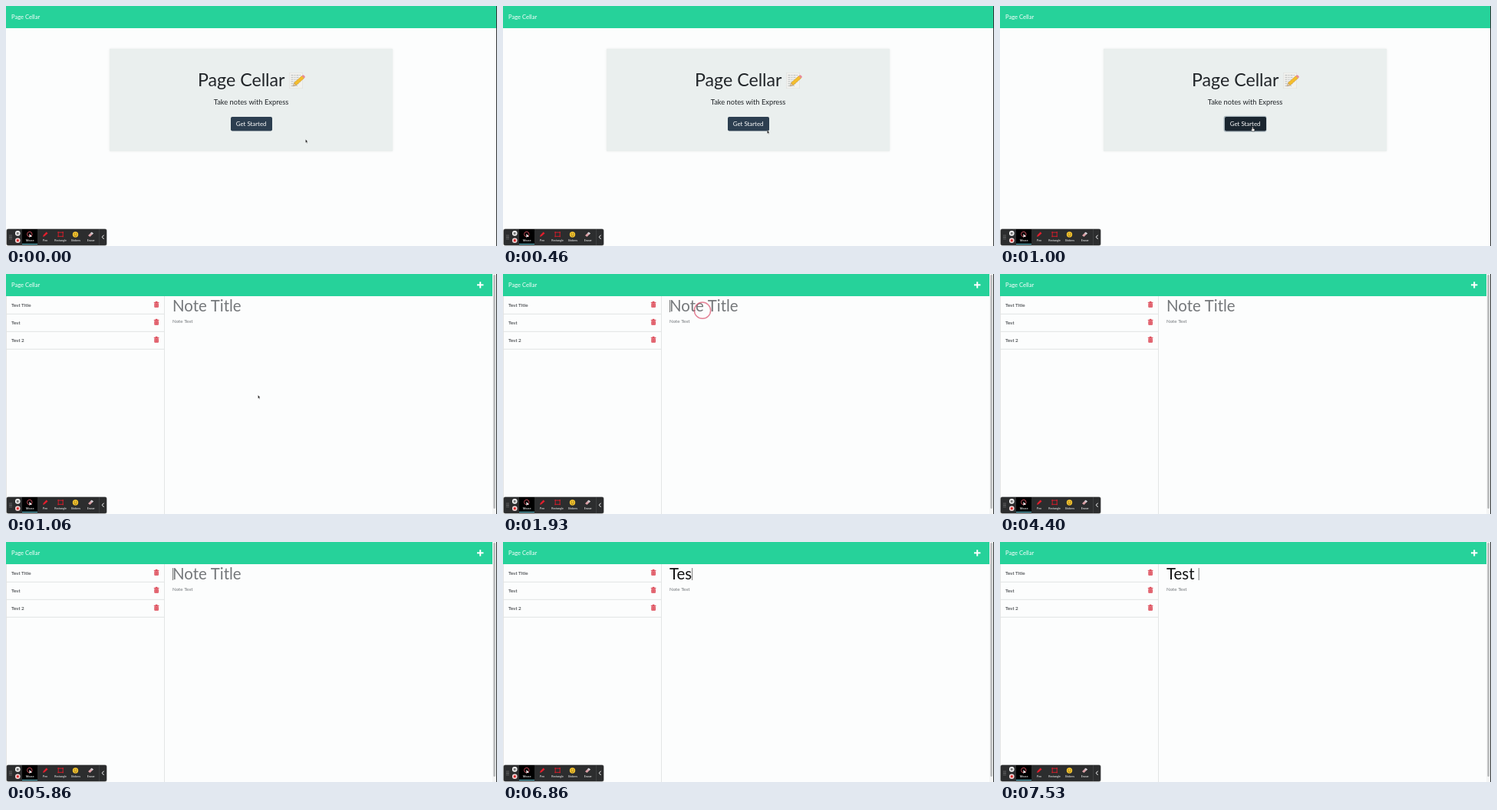
An HTML page with a canvas that plays this animation: 640x314 px, repeating every 8 s.

```html
<!DOCTYPE html>
<html lang="en">
<head>
<meta charset="utf-8">
<title>Notes app demo</title>
<style>
  html, body { margin: 0; width: 100%; height: 100%; overflow: hidden; background: #fcfdfd; }
  canvas { display: block; width: 640px; height: 314px; }
</style>
</head>
<body>
<canvas id="stage" width="640" height="314"></canvas>
<script>
const ctx = document.getElementById('stage').getContext('2d');
const LOOP = 8000;
const APP_NAME = 'Page Cellar';
const GREEN = '#26d29a', RED = '#dc4654';
const PAGE_CHANGE = 1060, PRESS = 800, FOCUS = 1900, BLINK = 490, RING_TIME = 200;
const KEYS = [[6260, 'T'], [6530, 'Te'], [6860, 'Tes'], [7060, 'Test'], [7530, 'Test ']];

function rect(x, y, w, h, fill, radius = 0) {
  ctx.fillStyle = fill;
  ctx.beginPath();
  ctx.roundRect(x, y, w, h, radius);
  ctx.fill();
}

function circle(x, y, r, fill) {
  ctx.fillStyle = fill;
  ctx.beginPath();
  ctx.arc(x, y, r, 0, Math.PI * 2);
  ctx.fill();
}

function line(color, width, ...points) {
  ctx.strokeStyle = color;
  ctx.lineWidth = width;
  ctx.beginPath();
  for (const [x, y] of points) ctx.lineTo(x, y);
  ctx.stroke();
}

function text(str, x, y, size, color, align = 'left', font = 'Lato, sans-serif') {
  ctx.font = `${size}px ${font}`;
  ctx.textAlign = align;
  ctx.fillStyle = color;
  ctx.fillText(str, x, y);
}

function shape(x, y, path, fill, stroke, width = 0.6) {
  const p = new Path2D(path);
  ctx.save();
  ctx.translate(x, y);
  ctx.fillStyle = fill;
  ctx.fill(p);
  if (stroke) {
    ctx.strokeStyle = stroke;
    ctx.lineWidth = width;
    ctx.stroke(p);
  }
  ctx.restore();
}

function memoIcon(x, y) {
  rect(x, y, 18, 21, '#dcdedd', 1);
  rect(x + 0.6, y + 0.6, 16.8, 19.8, '#f1f1ee', 1);
  for (let i = 0; i < 6; i++) {
    ctx.setLineDash([3, 1, 2, 1]);
    line('#a3a6a6', 0.7, [x + 2.5, y + 3.5 + i * 2.8], [x + 15 - (i % 3) * 2, y + 3.5 + i * 2.8]);
  }
  ctx.setLineDash([]);
  shape(x, y, 'M5 18 L6.5 13.5 L9.5 16.5Z', '#e5c79b', '#775a38', 0.3);
  shape(x, y, 'M6.5 13.5 L16.5 4.5 L19.5 7.5 L9.5 16.5Z', '#f4bd2c', '#b98520', 0.4);
  shape(x, y, 'M16.5 4.5 L18 3.2 Q20 3 21 6 L19.5 7.5Z', '#e98b95');
}

function header(width) {
  rect(0, 0, width, 29, GREEN);
  text(APP_NAME, 7, 17.3, 7.6, '#fff');
}

function landing(t) {
  header(639);
  ctx.save();
  ctx.shadowColor = 'rgba(0,0,0,.08)';
  ctx.shadowBlur = 3;
  rect(135, 56, 369, 134, '#eaefee');
  ctx.restore();
  text(APP_NAME, 250, 105, 23.2, '#212529');
  memoIcon(369, 87);
  text('Take notes with Express', 319.5, 129, 9.3, '#212529', 'center');
  const hover = t > 480, pressed = t >= PRESS;
  if (pressed) rect(291.5, 143.8, 56, 21, '#a9b6bd', 3);
  rect(293, 145, 54, 18.6, pressed ? '#1a252f' : hover ? '#1e2b37' : '#2c3e50', 2);
  text('Get Started', 319.6, 157.2, 7.9, '#fff', 'center');
}

function trash(x, y) {
  rect(x, y + 1, 6.6, 1.1, RED);
  rect(x + 2, y, 2.6, 1.2, RED);
  rect(x + 0.5, y + 2.4, 5.6, 5.6, RED, 0.7);
  for (let i = 0; i < 3; i++) line('#f0a9af', 0.5, [x + 1.8 + i * 1.5, y + 3.3], [x + 1.8 + i * 1.5, y + 7.1]);
}

function notes(t) {
  header(634);
  line('#fff', 2, [614, 14.3], [622.4, 14.3]);
  line('#fff', 2, [618.2, 10.2], [618.2, 18.5]);
  rect(634, 0, 5, 314, '#f4f5f5');
  rect(635.3, 1, 2.6, 306, '#b9bbbc', 1.3);
  line('#e3e5e5', 1, [206.5, 29], [206.5, 314]);
  line('#e3e5e5', 1, [0.5, 29], [0.5, 314]);
  ['Test Title', 'Test', 'Test 2'].forEach((name, i) => {
    const y = 29 + i * 23;
    text(name, 7, y + 14, 6.4, '#212529');
    trash(192.8, y + 6.8);
    line('#e1e4e4', 1, [0, y + 23.3], [206, y + 23.3]);
  });

  const key = KEYS.filter(([at]) => t >= at).pop();
  const typed = key ? key[1] : '';
  text(typed || 'Note Title', 217, 49.3, 20.4, typed ? '#111' : '#74777a');
  const caretX = 217.5 + (typed ? ctx.measureText(typed).width : 0);
  const since = t - (key ? key[0] : FOCUS);
  if (since >= 0 && Math.floor(since / BLINK) % 2 === 0) {
    line('#444', 0.7, [caretX, 34], [caretX, 50]);
  }
  text('Note Text', 217, 63.7, 6.2, '#6f7377');
}

function toolbar() {
  rect(0.5, 291.5, 131, 22, '#77797a', 2.5);
  rect(1, 292, 130, 21, '#2c2d2e', 2);
  for (let i = 0; i < 6; i++) circle(5 + (i % 2) * 2, 300 + (i >> 1) * 2.4, 0.55, '#a5a5a5');
  circle(15.3, 297.4, 3.3, '#f4f4f4');
  rect(14, 296, 0.9, 2.9, '#333');
  rect(15.7, 296, 0.9, 2.9, '#333');
  circle(15.3, 306.8, 3.3, '#f3d9d9');
  rect(13.8, 305.3, 3, 3, '#d92b2b', 0.5);
  rect(21, 292, 20, 20, '#000');
  rect(21, 311, 20, 1, '#58b9c9');

  ['Mouse', 'Pen', 'Rectangle', 'Stickers', 'Eraser'].forEach((label, i) => {
    text(label, 31.2 + i * 19.9, 307.6, 3.5, '#fff', 'center', 'bold'.length ? 'Roboto, sans-serif' : '');
  });
  ctx.strokeStyle = '#d85563';
  ctx.lineWidth = 0.9;
  ctx.beginPath();
  ctx.arc(30.8, 298.6, 3.2, 0, Math.PI * 2);
  ctx.stroke();
  shape(30.5, 298, 'M0 0 L0 5 L1.3 3.8 L3.5 3.7Z', '#fff');
  shape(48, 295, 'M0 7 L.7 4.8 L4.7 .6 L6.5 2.4 L2.3 6.3Z', '#e21f2d');
  ctx.strokeStyle = '#c81f2b';
  ctx.lineWidth = 1;
  ctx.strokeRect(68.2, 296.2, 6, 5.2);
  for (const x of [68.2, 74.2]) for (const y of [296.2, 301.4]) circle(x, y, 0.9, '#c81f2b');
  circle(90.5, 299, 3.7, '#f5c52f');
  circle(89.1, 298.1, 0.6, '#553b10');
  circle(91.9, 298.1, 0.6, '#553b10');
  line('#553b10', 0.6, [88.6, 300], [90.5, 301.2], [92.4, 300]);
  shape(107, 295, 'M0 5.2 L4.5 .8 L7 2.6 L2.5 7Z', '#dba0a6');
  shape(107, 295, 'M3 2.2 L4.5 .8 L7 2.6 L5.5 4Z', '#c8cdd2');
  line('#4b4c4d', 0.6, [121.5, 292], [121.5, 313]);
  line('#fff', 1, [127.5, 299.7], [125.3, 302.3], [127.5, 304.9]);
}

const ease = (t, from, to) => {
  const p = Math.min(1, Math.max(0, (t - from) / (to - from)));
  return p * p * (3 - 2 * p);
};

function pointer(t) {
  if (t >= 1600) return;
  const move = ease(t, 60, 660), toTitle = ease(t, 1200, 1460);
  const x = 390.5 - 62 * move - 68 * toTitle;
  const y = 174.5 - 16 * move - 111 * toTitle;
  if (t < PAGE_CHANGE && t > 480) {
    shape(x, y, 'M0 0 Q1-1 1.4 0 L1.4 2 L3.5 2.6 L3.2 5.4 L.2 5.4 L-1.6 3 L0 3Z', '#fff', '#111', 0.5);
  } else if (toTitle > 0.95) {
    line('#555', 0.7, [x, y - 3], [x, y + 3]);
  } else {
    shape(x, y, 'M0 0 L0 4.2 L.9 3.4 L1.6 5 L2.3 4.7 L1.6 3.1 L2.8 3Z', '#111', '#fff', 0.25);
  }
}

function clickRing(t, start, x, y) {
  const p = (t - start) / RING_TIME;
  if (p < 0 || p >= 1) return;
  ctx.globalAlpha = 0.7 * (1 - p);
  ctx.strokeStyle = '#d84865';
  ctx.lineWidth = 1.5;
  ctx.beginPath();
  ctx.arc(x, y, 10.6 + p, 0, Math.PI * 2);
  ctx.stroke();
  ctx.globalAlpha = 1;
}

function draw(now) {
  const t = now % LOOP;
  rect(0, 0, 640, 314, '#fcfdfd');
  (t < PAGE_CHANGE ? landing : notes)(t);
  rect(639, 0, 1, 314, '#333637');
  toolbar();
  pointer(t);
  clickRing(t, PRESS, 328.5, 158.5);
  clickRing(t, 1925, 260, 47.7);
}

const begin = performance.now();
function tick() {
  draw(performance.now() - begin);
  requestAnimationFrame(tick);
}
tick();
</script>
</body>
</html>
```
